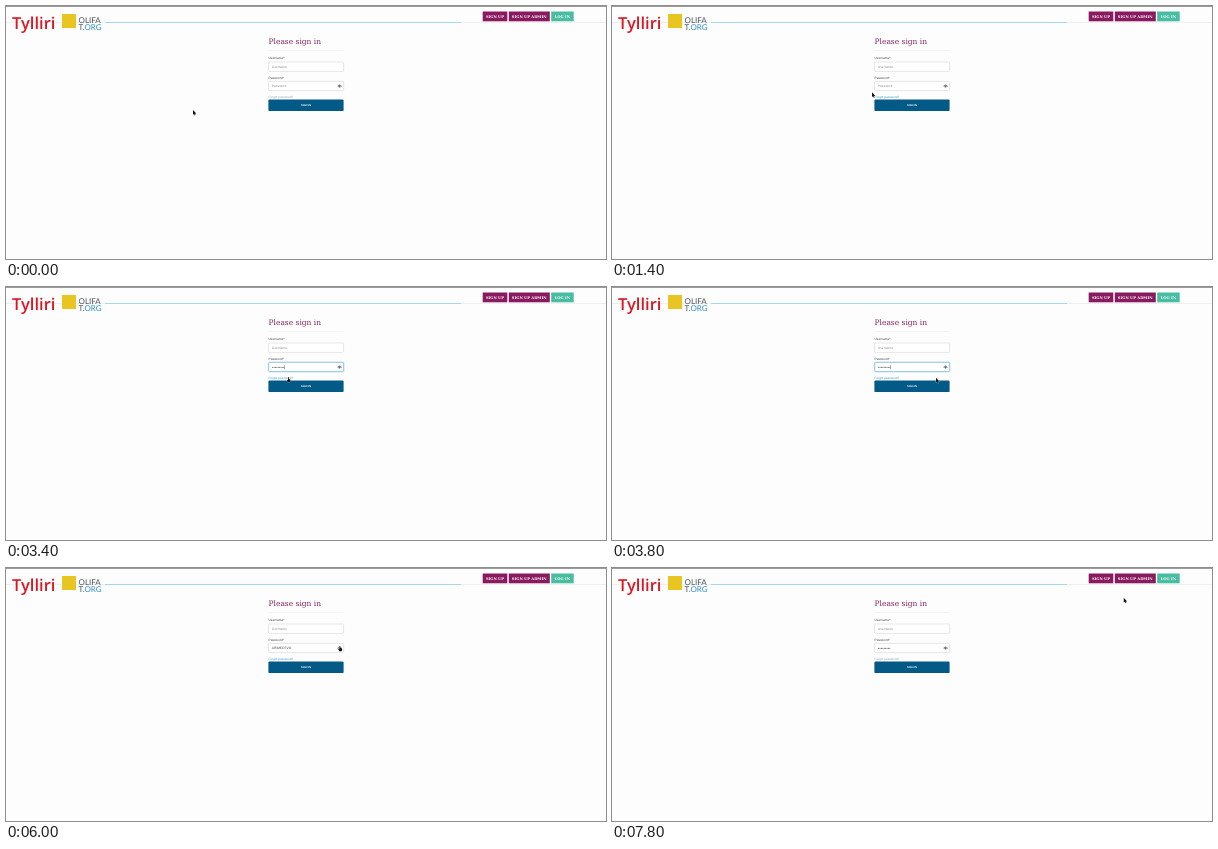
Animation, 600 px wide and 253 px high, one loop 8000 ms. Source, as an HTML page:

```html
<!DOCTYPE html>
<html lang="en">
<head>
<meta charset="utf-8">
<title>Sign in</title>
<style>
  html, body { margin: 0; width: 100%; height: 100%; overflow: hidden; background: #fdfdfd; }
  svg { display: block; width: 100vw; height: 100vh; }
  text { font-family: "Liberation Sans", sans-serif; font-size: 3.3px; text-rendering: geometricPrecision; white-space: pre; }
  .serif { font-family: "DejaVu Serif", serif; }
  .nav { font-size: 3.7px; font-weight: bold; fill: #fff; text-anchor: middle; }
  .brand { font: 600 16.5px "Open Sans", sans-serif; fill: #da1822; }
  .org { font: 8px Lato, sans-serif; fill: #4c5257; }
  .label { font-size: 3.2px; fill: #444; }
  .hint { fill: #8c8c8c; }
  .field { fill: #fff; stroke: #ccc; stroke-width: .5; }
</style>
</head>
<body>
<svg viewBox="0 0 600 253">
  <rect width="600" height="1" fill="#9c9c9f"/>
  <rect y="16" width="600" height="1" fill="#eceef0"/>
  <rect x="99" y="16" width="356" height="1" fill="#a6d8ec"/>

  <text class="brand" x="6" y="23">Tylliri</text>
  <rect x="56" y="8" width="14" height="14" fill="#e9c522"/>
  <text class="org" x="72.5" y="17">OLIFA</text>
  <text class="org" x="72.5" y="23.8">T.<tspan fill="#2d8fc4">ORG</tspan></text>

  <g fill="#8a1a60">
    <rect x="476.7" y="5.5" width="24.6" height="9.8"/>
    <rect x="502.8" y="5.5" width="41" height="9.8"/>
    <rect x="545.2" y="5.5" width="22.5" height="9.8" fill="#48bda2"/>
  </g>
  <text class="serif nav" x="489" y="12">SIGN UP</text>
  <text class="serif nav" x="523.2" y="12">SIGN UP ADMIN</text>
  <text class="serif nav" x="556.4" y="12">LOG IN</text>

  <text class="serif" x="262.5" y="38" style="font-size:7.5px" fill="#832060">Please sign in</text>
  <rect x="262.5" y="44" width="75" height=".6" fill="#f1f1f1"/>
  <text class="label" x="262.5" y="53">Username*</text>
  <rect class="field" x="262.6" y="56" width="75" height="9.4" rx="1"/>
  <text class="hint" x="265.8" y="62">Username</text>

  <text class="label" x="262.5" y="72.7">Password*</text>
  <rect class="field" x="262.6" y="75.4" width="75" height="9.2" rx="1"/>
  <g id="ring" fill="none" stroke="#84c4ee">
    <rect x="262.5" y="75.3" width="75.2" height="9.4" rx="1.2" stroke-width="1.6" opacity=".25"/>
    <rect x="262.6" y="75.4" width="75" height="9.2" rx="1" stroke-width=".7"/>
  </g>
  <text id="pass" x="265.8" y="81.3"></text>
  <g id="dots" fill="#444"></g>
  <rect id="caret" y="78" width=".4" height="4.2" fill="#444"/>
  <path d="M331.6 80.1Q333.6 77.6 335.6 80.1Q333.6 82.6 331.6 80.1Z" fill="#fff" stroke="#555" stroke-width=".6"/>
  <circle cx="333.6" cy="80.1" r=".8" fill="#444"/>

  <text id="link" x="262.5" y="92.1" style="font-size:3.1px">Forgot password?</text>
  <rect x="262.4" y="93.4" width="75.2" height="11.7" rx="1.2" fill="#045a87"/>
  <text x="300" y="100.3" fill="#fff" text-anchor="middle" style="font-size:2.7px;font-weight:bold">SIGN IN</text>

  <g id="cursor" stroke-linejoin="round">
    <path id="arrow" d="M0 0V4.8L1.1 3.9L1.8 5.4L2.6 5L1.9 3.6H3.3Z" fill="#111" stroke="#fff" stroke-width=".4" paint-order="stroke"/>
    <path id="beam" d="M-.9 -2.4H.9M0 -2.4V2.6M-.9 2.6H.9" fill="none" stroke="#444" stroke-width=".6"/>
    <path id="hand" d="M-.5 0H.4V1.8L2 2.4V4L1.5 5H-.7L-1.7 3.1L-1.4 2.6L-.5 3.1Z" fill="#111" stroke="#fff" stroke-width=".4" paint-order="stroke"/>
  </g>
</svg>
<script>
const LOOP = 8000, STEP = 200, SECRET = "ARIMED7VO";
const $ = id => document.getElementById(id);

// time, x, y, pointer shape
const path = [
  [0, 187, 104, "arrow"], [800, 234, 95, "arrow"], [1400, 260, 86.3, "arrow"],
  [1600, 264.5, 84, "beam"], [2000, 268.7, 83.8, "beam"], [3000, 268.7, 83.8, "beam"],
  [3200, 273, 89, "arrow"], [3400, 282.5, 90.3, "hand"], [3600, 304, 91, "arrow"],
  [3800, 324, 90.8, "arrow"], [4000, 334, 78.2, "hand"],
  [7200, 334, 78.2, "hand"], [7400, 352, 101, "arrow"], [7800, 511.8, 29.8, "arrow"]
];

[...SECRET].forEach((_, i) => {
  $("dots").innerHTML += `<circle cx="${266.6 + i * 1.4}" cy="80.2" r=".5"/>`;
});

function pointer(t) {
  const i = path.findLastIndex(p => p[0] <= t);
  const a = path[i], b = path[i + 1] || a;
  const k = b === a ? 0 : (t - a[0]) / (b[0] - a[0]);
  return [a[1] + (b[1] - a[1]) * k, a[2] + (b[2] - a[2]) * k, a[3]];
}

const show = (id, on) => $(id).setAttribute("opacity", +on);

function draw(time) {
  const t = Math.floor(time % LOOP / STEP) * STEP;
  const [x, y, shape] = pointer(t);
  $("cursor").setAttribute("transform", `translate(${x} ${y})`);
  for (const id of ["arrow", "beam", "hand"]) show(id, id === shape);

  const typed = Math.max(0, Math.min(SECRET.length, (t - 2400) / STEP * 3));
  const shown = t >= 5400 && t < 7200;
  $("pass").textContent = typed === 0 ? "Password" : shown ? SECRET : "";
  $("pass").setAttribute("fill", typed ? "#444" : "#8c8c8c");
  [...$("dots").children].forEach((dot, i) => dot.setAttribute("opacity", +(i < typed && !shown)));

  show("ring", t < 2000 ? 0 : t < 5400 ? 1 : t < 5600 ? .5 : 0);
  show("caret", t >= 2000 && t < 4400);
  $("caret").setAttribute("x", 265.7 + typed * 1.4);
  $("link").setAttribute("fill", t >= 1400 && t < 7200 ? "#3d9bd0" : "#8ba9bb");
}

const start = performance.now();
(function tick() {
  draw(performance.now() - start);
  requestAnimationFrame(tick);
})();
</script>
</body>
</html>
```
